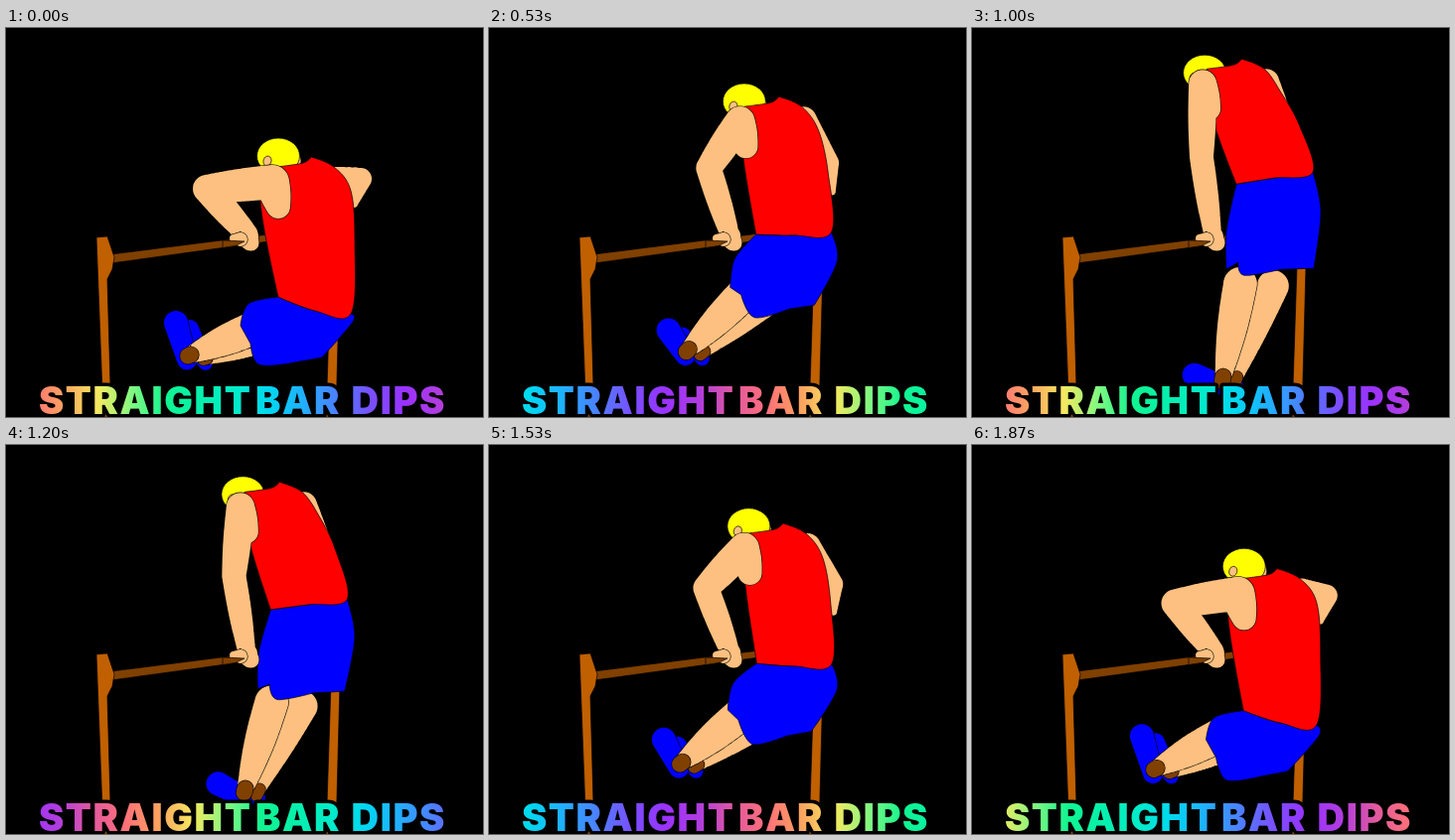
Recreate the animation shown at these times as an HTML page with a canvas. Size 480 px wide and 392 px high, loop 1.94 s.

```html
<!DOCTYPE html>
<html lang="en">
<head>
<meta charset="utf-8">
<title>Straight bar dips</title>
<style>
html, body { margin: 0; width: 100%; height: 100%; overflow: hidden; background: #000; }
canvas { display: block; }
</style>
</head>
<body>
<canvas id="stage" width="480" height="392"></canvas>
<script>
const ctx = document.getElementById('stage').getContext('2d');
const LOOP = 1940, STEPS = 29, TOP_STEP = 15.5;
const SKIN = '#fdc080', RED = '#ff0000', BLUE = '#0000ff', YELLOW = '#ffff00',
      WOOD = '#c06000', BROWN = '#804000';
const RAINBOW = ['#ff7078', '#fba35f', '#f5e960', '#80f880', '#10f590', '#06f0ac', '#00ecc8',
                 '#00d8f0', '#20b0ff', '#4c80ff', '#7850ff', '#9a32ff', '#b03ce0', '#e058a0'];

const add = ([x, y], dx, dy) => [x + dx, y + dy];
const lerp = (a, b, s) => a.map((v, i) => v + (b[i] - v) * s);

// Height of the body: 0 at the bottom of the dip, 1 with straight arms
function lift(step) {
  const u = step < TOP_STEP ? step / TOP_STEP : (STEPS - step) / (STEPS - TOP_STEP);
  const s = Math.sin(u * Math.PI / 2);
  return .65 * s + .35 * s * s;
}

function paint(color) {
  ctx.fillStyle = color;
  ctx.fill();
  ctx.strokeStyle = '#000';
  ctx.lineWidth = .7;
  ctx.stroke();
}

// Closed curve through the points; listed corners stay sharp
function blob(pts, color, corners = []) {
  const n = pts.length, at = i => pts[(i + n) % n];
  const handle = (i, dir) => {
    const a = at(i - 1), b = at(i + 1), pull = corners.includes(i % n) ? 0 : dir / 6;
    return add(at(i), (b[0] - a[0]) * pull, (b[1] - a[1]) * pull);
  };
  ctx.beginPath();
  ctx.moveTo(...pts[0]);
  for (let i = 0; i < n; i++)
    ctx.bezierCurveTo(...handle(i, 1), ...handle(i + 1, -1), ...at(i + 1));
  paint(color);
}

function poly(color, ...pts) {
  blob(pts, color, pts.map((_, i) => i));
}

function oval([x, y], rx, ry, color, turn = 0) {
  ctx.beginPath();
  ctx.ellipse(x, y, rx, ry, turn, 0, 7);
  paint(color);
}

// Rounded limb through joints [x, y, radius], thicker between them by bulge
function limb(color, joints, bulge = 0) {
  for (const [edge, fill] of [[.6, '#000'], [0, color]]) {
    ctx.beginPath();
    for (let i = 1; i < joints.length; i++)
      for (let s = 0; s <= 1; s += 1 / 32) {
        const [x, y, r] = lerp(joints[i - 1], joints[i], s);
        const size = r + bulge * Math.sin(s * Math.PI) + edge;
        ctx.moveTo(x + size, y);
        ctx.arc(x, y, size, 0, 7);
      }
    ctx.fillStyle = fill;
    ctx.fill();
  }
}

function frame() {
  poly(WOOD, [327, 240], [336, 240], [332, 392], [322, 392]);
  poly(BROWN, [106, 228], [272, 207], [272, 214], [106, 237]);
  poly(WOOD, [91, 211], [102, 210], [105, 219], [109, 231], [107, 243], [102, 253],
       [106, 392], [98, 392]);
}

function athlete(p) {
  // Travel from the low to the high position, eased per axis
  const move = (x0, y0, x1, y1, ex = 1, ey = ex) =>
    [x0 + (x1 - x0) * p ** ex, y0 + (y1 - y0) * p ** ey];
  const from = (base, ...path) => add(base, ...move(...path));

  const head = move(274, 129, 234, 45, 2, 1);
  const neck = move(272, 140, 236, 41, 2, 1.15);
  const waist = move(274, 271, 266, 157, 1, 1.4);
  const waistMid = from(waist, 37, 14, 37, -6);
  const waistRight = from(waist, 73, 17, 77, -12);
  const farShoulder = add(neck, 58, 0), peak = add(neck, 35, -10), side = add(neck, 75, 24);

  const knee = move(248, 303, 270, 258, 2.4, .6);
  const ankle = add(move(189, 328, 254, 347, 3.5, 1), 0, -22 * Math.sin(p * Math.PI));
  const farKnee = from(knee, 2, 17, 33, 2, 1.3, 2);
  const farAnkle = add(ankle, 13, 5);
  const toe = from(ankle, -18, -31, -30, 3, 2);
  const heel = lerp(knee, ankle, 1.1), farHeel = lerp(farKnee, farAnkle, 1.07);

  // Far arm and head
  limb(SKIN, [[...add(farShoulder, 2, 13), 13], [...move(357, 152, 320, 115, 2), 11],
              [...move(350, 177, 338, 148, 2), 4]]);
  oval(add(head, 3, 5), 20, 16, SKIN);
  oval(head, 21.5, 18, YELLOW);
  oval(add(head, -11, 5), 4, 5, SKIN, .3);

  // Shoes, legs and socks
  limb(BLUE, [[...add(toe, 14, 6), 9], [...farHeel, 8], [...add(farHeel, 2, 4), 7]]);
  limb(BLUE, [[...toe, 12], [...add(heel, -1, 4), 10]]);
  limb(SKIN, [[...farKnee, 10 + 6 * p], [...farAnkle, 6]], 1);
  limb(BROWN, [[...farAnkle, 6], [...farHeel, 6]]);
  limb(SKIN, [[...knee, 17], [...ankle, 9]], 2);
  limb(BROWN, [[...lerp(ankle, heel, .5), 8], [...heel, 8]]);

  blob([
    waist, waistMid, waistRight,
    from(waist, 75, 25, 85, 28),
    from(waist, 44, 61, 78, 85, 2),
    from(waist, 11, 67, 45, 86, 1, 2),
    from(waist, -20, 68, 8, 92),
    from(waist, -28, 47, 2, 79, 2),
    from(waist, -38, 29, -10, 86, 2),
    from(waist, -30, 7, -10, 48, 2)
  ], BLUE, [0, 2, 4, 5, 7, 8]);

  blob([
    neck, add(peak, -8, 6), peak, farShoulder, side,
    add(lerp(side, waistRight, .45), 4, -3),
    waistRight, waistMid, waist,
    from(neck, -16, 33, 6, 50)
  ], RED, [0, 2, 8]);

  // Near arm with deltoid and the hand resting on the bar
  limb(SKIN, [[...add(neck, 2, 40), 12], [...add(neck, -4, 15), 17 - 3 * p],
              [...move(202, 162, 231, 130), 14 - 2 * p], [242, 207, 11 - 2 * p],
              [244, 214, 9], [248, 218, 6]], 1);
  limb(SKIN, [[229, 212, 4], [236, 213, 7]]);
  poly(BROWN, [218, 214], [240, 215], [231, 219.5], [218, 221.5]);
}

function caption(step) {
  const start = 24 + step * 32 % 480, count = RAINBOW.length;
  const fill = ctx.createLinearGradient(start - 480, 0, start + 480, 0);
  for (let i = 0; i <= 2 * count; i++)
    fill.addColorStop(i / count / 2, RAINBOW[i % count]);
  ctx.font = '900 38px Inter, "Open Sans", sans-serif';
  ctx.letterSpacing = '1.7px';
  ctx.strokeStyle = '#000';
  ctx.lineWidth = 7;
  const words = [['STRAIGHT', 33], ['BAR', 251], ['DIPS', 347.5]];
  for (const [word, x] of words) ctx.strokeText(word, x, 389);
  ctx.fillStyle = fill;
  for (const [word, x] of words) ctx.fillText(word, x, 389);
}

function draw(step) {
  ctx.fillStyle = '#000';
  ctx.fillRect(0, 0, 480, 392);
  ctx.lineJoin = 'round';
  frame();
  athlete(lift(step));
  caption(step);
}

function tick() {
  const t = performance.now() % LOOP;
  draw(Math.min(STEPS - 1, Math.floor((t + 3.4) * .015)));
  requestAnimationFrame(tick);
}
tick();
</script>
</body>
</html>
```
